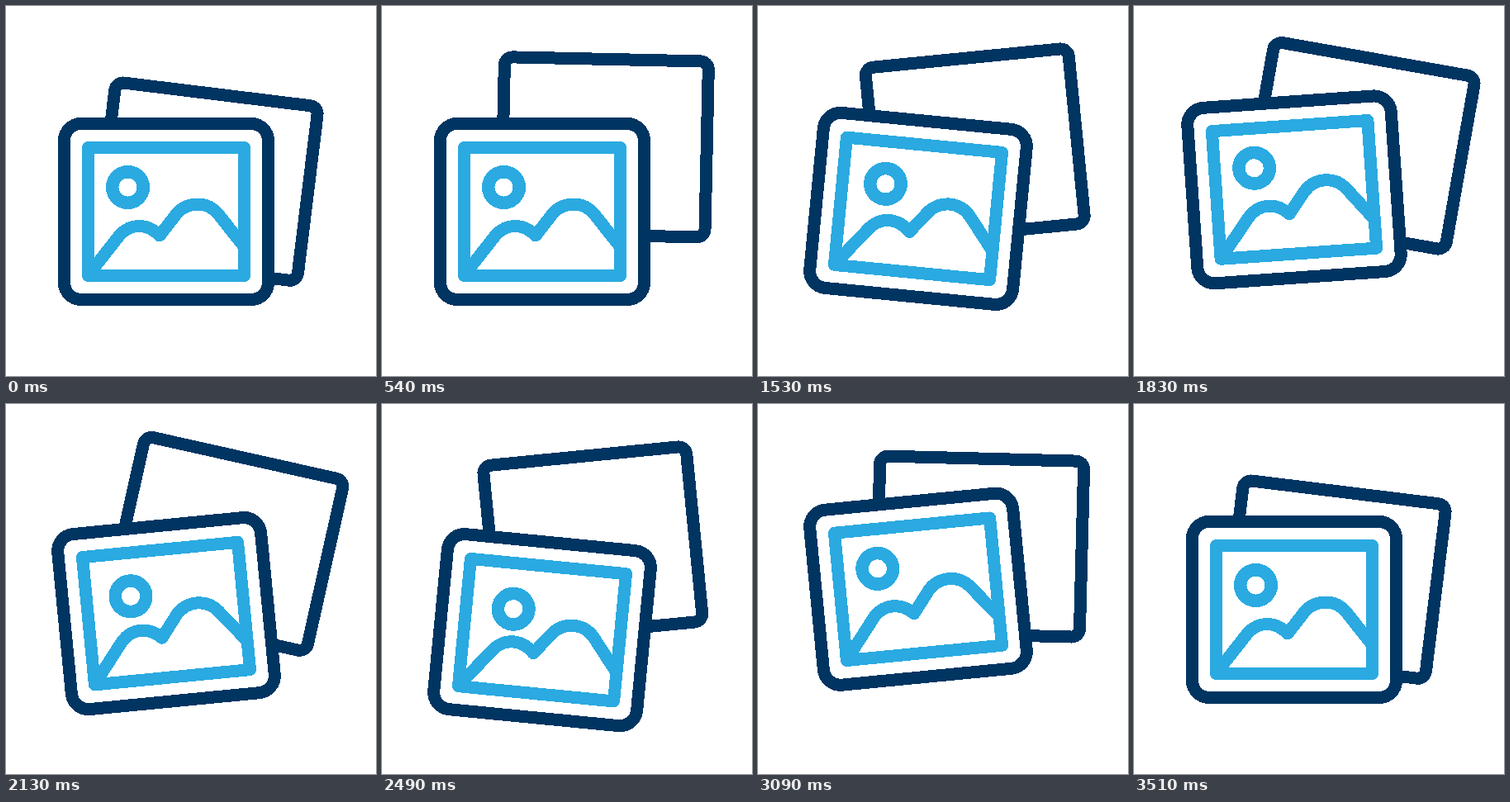
Animation, 448 px wide and 448 px high, one loop 3600 ms. Source, as an HTML page:

```html
<!DOCTYPE html>
<html lang="en">
<head>
<meta charset="utf-8">
<title>Picture cards</title>
<style>
  html, body { margin: 0; width: 100%; height: 100%; overflow: hidden; background: #fff; }
  svg { display: block; width: 100vw; height: 100vh; }
</style>
</head>
<body>
<svg viewBox="0 0 448 448" fill="none" stroke-width="15" stroke-linejoin="round" shape-rendering="crispEdges">
  <g stroke="#003562" fill="#fff">
    <rect id="back" x="-123.5" y="-123.5" width="247" height="213" rx="10"/>
  </g>
  <g id="front" stroke="#2aaae1">
    <rect x="-123.5" y="-106.5" width="247" height="213" rx="20.5" stroke="#003562" fill="#fff"/>
    <rect x="-94.5" y="-77.5" width="189" height="155"/>
    <path d="M-93 75L-56 28Q-46 17.5-33 17.5Q-19 17.5-8 29L13 2Q23-9 38-9Q53-9 63 3L94 42"/>
    <circle id="sun" cx="-46.5" cy="-29.5" r="18.75" stroke-width="15.5"/>
  </g>
</svg>
<script>
const LOOP = 3600, STEP = 30, BEAT = 600, END = 3510;
const [back, front, sun] = ["back", "front", "sun"].map(id => document.getElementById(id));

const clamp = (v, max) => Math.min(max, Math.max(0, v));
const smooth = p => p * p * (3 - 2 * p);

// Eased step from 0 to 1.
const ramp = (t, from, to) => smooth(clamp((t - from) / (to - from), 1));

// Eased zigzag between 0 and 1, one leg per beat.
function wave(t, start, legs) {
  const beats = clamp((t - start) / BEAT, legs);
  const s = smooth(beats % 1);
  return Math.floor(beats) % 2 ? 1 - s : s;
}

function place(el, x, y, turn = 0) {
  el.setAttribute("transform", `translate(${x} ${y}) rotate(${turn})`);
}

function pose(t) {
  const home = ramp(t, 3000, END);
  const out = ramp(t, 120, 600) - home;
  const lift = ramp(t, 600, 1200) - home;
  const tilt = ramp(t, 600, 1410);
  const bob = wave(t, 600, 4);

  place(back, 240.6 + 30 * out - 14.5 * bob, 229.5 - 43.5 * out,
    7 - 6 * out - 9 * tilt + 23 * wave(t, 1410, 2) + 9 * ramp(t, 2610, 3000));
  place(front, 194, 249 - 27 * lift + 55 * bob,
    7 * tilt - 14 * wave(t, 1410, 3) + 7 * ramp(t, 3210, END));
  place(sun, 10 * bob, 8 * bob);
}

function draw() {
  const t = Math.floor(performance.now() % LOOP / STEP) * STEP;
  // The resting pose holds until 150 ms.
  pose(t < 150 ? 0 : t);
  requestAnimationFrame(draw);
}
draw();
</script>
</body>
</html>
```
